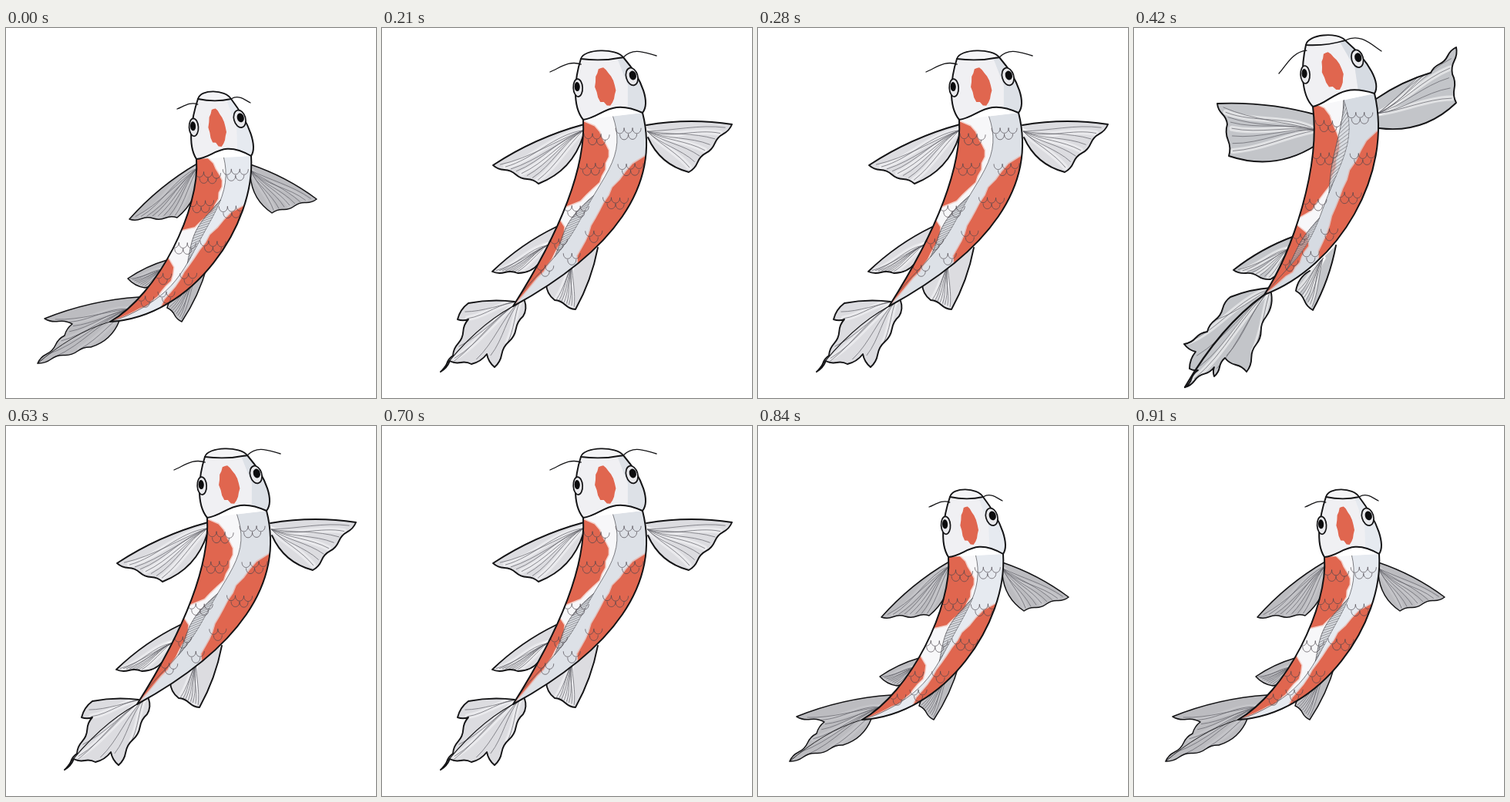
An HTML page with a canvas that plays this animation: 480 by 480 pixels, repeating every 1050 ms.

```html
<!DOCTYPE html>
<html lang="en">
<head>
<meta charset="utf-8">
<title>Swimming koi</title>
<style>
html, body { margin: 0; width: 100%; height: 100%; overflow: hidden; background: #fff; }
canvas { display: block; width: 480px; height: 480px; }
</style>
</head>
<body>
<canvas id="stage" width="480" height="480"></canvas>
<script>
const ctx = document.getElementById("stage").getContext("2d");
const INK = "#141416", ORANGE = "#e0664f", HATCH = "#4a4a50";
const POSE_MS = 210;
const ORDER = [0, 1, 2, 1, 0];

// left, right: Bezier flanks from neck to tail. mouth: its two corners.
// fins: leading root, rim corners, trailing root; the last fin is the tail.
// patches: [side, from, to, depth] and dorsal: [from, to], as shares of the body.
const poses = [
  {
    left: [[247, 170], [252, 235], [198, 345], [135, 381]],
    right: [[318, 166], [324, 255], [243, 375], [135, 381]],
    mouth: [[249, 92], [292, 92]],
    whiskers: [[222, 105], [317, 97]],
    fins: [
      [[248, 176], [160, 248], [222, 246], [250, 186]],
      [[317, 177], [403, 222], [345, 240], [317, 192]],
      [[209, 301], [158, 325], [180, 337], [199, 325]],
      [[261, 309], [228, 381], [209, 363], [230, 338]],
      [[173, 349], [50, 377], [86, 384], [76, 399], [41, 435], [110, 414], [147, 380]]
    ],
    patches: [[0, -0.03, 0.4, 0.46], [1, 0.23, 0.78, 0.45], [0, 0.55, 1, 0.5]],
    dorsal: [[0.22, 0.54]], drift: 0,
    tint: "#bcbcc0", streak: 0.12, shade: "#e6eaf0", finLine: 1.5, rib: 0.9
  },
  {
    left: [[261, 119], [265, 195], [215, 290], [170, 361]],
    right: [[338, 110], [362, 205], [300, 290], [170, 361]],
    mouth: [[258, 40], [313, 38]],
    whiskers: [[218, 57], [356, 36]],
    fins: [
      [[262, 125], [144, 178], [203, 202], [261, 140]],
      [[343, 126], [454, 125], [398, 187], [345, 142]],
      [[226, 258], [143, 316], [176, 318], [204, 305]],
      [[280, 285], [251, 365], [224, 353], [213, 332]],
      [[172, 355], [112, 357], [98, 378], [112, 378], [92, 425], [76, 446],
        [88, 432], [116, 436], [136, 423], [146, 440], [183, 374], [185, 354]]
    ],
    patches: [[0, 0.01, 0.46, 0.4], [1, 0.2, 0.75, 0.43], [0, 0.53, 1, 0.26]],
    dorsal: [[0.4, 0.72]], drift: 0.5,
    tint: "#dcdce0", streak: 0.4, shade: "#dde1e7", finLine: 1.9, rib: 1.2
  },
  {
    left: [[232, 102], [242, 180], [206, 290], [169, 346]],
    right: [[312, 85], [337, 190], [265, 310], [169, 346]],
    mouth: [[223, 22], [274, 16]],
    whiskers: [[188, 59], [321, 30]],
    fins: [
      [[238, 113], [108, 98], [121, 125], [123, 166], [236, 152]],
      [[314, 92], [385, 58], [418, 25], [413, 60], [418, 97], [318, 130]],
      [[208, 270], [129, 314], [177, 326], [195, 303]],
      [[262, 282], [232, 366], [210, 341], [228, 315]],
      [[178, 337], [125, 349], [95, 394], [65, 410], [80, 420], [72, 442], [83, 444],
        [66, 466], [104, 440], [104, 452], [118, 428], [146, 446], [171, 375], [177, 340]]
    ],
    patches: [[0, -0.02, 0.55, 0.38], [1, 0.15, 0.73, 0.4], [0, 0.59, 1, 0.55]],
    dorsal: [[0, 0.42], [0.54, 0.82]], drift: 0.3,
    tint: "#c3c5c9", streak: 0.5, shade: "#d6dbe2", finLine: 1.9, rib: 2.2
  }
];

const SCALE_SPOTS = [[0.11, 0.22], [0.09, 0.72], [0.26, 0.2], [0.26, 0.8], [0.43, 0.76],
  [0.48, 0.2], [0.6, 0.75], [0.65, 0.2], [0.72, 0.7], [0.79, 0.3]];

const lerp = (a, b, t) => a + (b - a) * t;
const mix = (p, q, t) => [lerp(p[0], q[0], t), lerp(p[1], q[1], t)];
const gap = (p, q) => Math.hypot(q[0] - p[0], q[1] - p[1]);
const range = n => Array.from({ length: n }, (_, i) => i);

function noise(seed) {
  const n = Math.sin(seed * 12.9898) * 43758.5453;
  return (n - Math.floor(n)) * 2 - 1;
}

function bezierAt([a, b, c, d], t) {
  const ab = mix(a, b, t), bc = mix(b, c, t), cd = mix(c, d, t);
  return mix(mix(ab, bc, t), mix(bc, cd, t), t);
}

// A point on the body: u runs from neck to tail, v from left to right.
const onBody = (pose, u, v) => mix(bezierAt(pose.left, u), bezierAt(pose.right, u), v);

// A point on the head: s runs from left to right, t from mouth to neck.
const onHead = (pose, s, t) =>
  mix(mix(...pose.mouth, s), mix(pose.left[0], pose.right[0], s), t);

function line(points) {
  const path = new Path2D();
  points.forEach(p => path.lineTo(...p));
  return path;
}

function fill(path, color) {
  ctx.fillStyle = color;
  ctx.fill(path);
}

function stroke(path, width, color = INK) {
  ctx.lineWidth = width;
  ctx.strokeStyle = color;
  ctx.stroke(path);
}

function clipped(path, draw) {
  ctx.save();
  ctx.clip(path);
  draw();
  ctx.restore();
}

// A curve from a to b, bent sideways near each end by a share of its length.
function wave(a, b, bend1, bend2) {
  const path = new Path2D();
  const side = (t, bend) => {
    const [x, y] = mix(a, b, t);
    return [x - (b[1] - a[1]) * bend, y + (b[0] - a[0]) * bend];
  };
  path.moveTo(...a);
  path.bezierCurveTo(...side(0.33, bend1), ...side(0.67, bend2), ...b);
  return path;
}

function finOutline(points) {
  const path = new Path2D();
  const last = points.length - 2;
  const [, tip] = points, end = points[last];
  const turn = Math.sign((tip[0] - points[0][0]) * (end[1] - tip[1]) -
    (tip[1] - points[0][1]) * (end[0] - tip[0])) || 1;
  const bow = (a, b, share) => {
    const [x, y] = mix(a, b, 0.5);
    path.quadraticCurveTo(x + (b[1] - a[1]) * share * turn, y - (b[0] - a[0]) * share * turn, ...b);
  };
  path.moveTo(...points[0]);
  for (let i = 0; i <= last; i++) {
    const a = points[i], b = points[i + 1];
    if (i === 0) bow(a, b, 0.08);
    else if (i === last) bow(a, b, 0.24);
    else {
      const folds = Math.max(1, Math.round(gap(a, b) / 17));
      range(folds).forEach(k =>
        bow(mix(a, b, k / folds), mix(a, b, (k + 1) / folds), k % 2 ? -0.18 : 0.18));
    }
  }
  return path;
}

function drawFin(points, pose) {
  const shape = finOutline(points);
  const rim = points.slice(1, -1);
  const root = mix(points[0], points[points.length - 1], 0.5);
  const rays = range(8).map(i => {
    const place = (i + 0.5) / 8 * (rim.length - 1), k = Math.floor(place);
    return wave(root, mix(root, mix(rim[k], rim[k + 1], place - k), 0.95),
      0.06 + 0.05 * noise(i), -0.06);
  });
  fill(shape, pose.tint);
  clipped(shape, () => {
    rays.forEach((ray, i) => {
      if (i % 3 === 1) stroke(ray, 7, `rgba(255,255,255,${pose.streak})`);
    });
    rays.forEach(ray => stroke(ray, 0.7, "#606168"));
  });
  stroke(shape, pose.finLine);
}

function drawTailRib(pose) {
  const tail = pose.fins[pose.fins.length - 1], root = pose.left[3];
  const tip = tail.reduce((far, p) => gap(root, p) > gap(root, far) ? p : far);
  stroke(wave(root, tip, 0.08, 0.06), pose.rib);
}

// A patch grows in from one flank, deepest halfway, with an uneven rim.
function drawPatch(pose, [side, from, to, depth], seed) {
  const steps = 14;
  const inner = range(steps + 1).map(i => {
    const p = i / steps;
    const d = depth * Math.sqrt(Math.sin(Math.PI * p)) * (1 + 0.1 * noise(i + seed * 31));
    return onBody(pose, lerp(from, to, p), side ? 1 - d : d);
  });
  const outer = range(steps + 1).map(i =>
    onBody(pose, lerp(to, from, i / steps), side ? 1.1 : -0.1));
  const shape = line([...inner, ...outer]);
  stroke(shape, 3, "rgba(236,140,120,0.4)");
  fill(shape, ORANGE);
}

const spineAt = (pose, u, offset = 0) =>
  onBody(pose, u, 0.5 + 0.05 * Math.sin(u * 11) - pose.drift * u * u - offset);

function drawDorsal(pose, [from, to]) {
  const steps = 22;
  const us = range(steps + 1).map(i => lerp(from, to, i / steps));
  const ridge = us.map(u => spineAt(pose, u));
  const edge = us.map((u, i) => spineAt(pose, u, 0.17 * Math.sin(Math.PI * i / steps)));
  fill(line([...ridge, ...[...edge].reverse()]), "rgba(198,203,210,0.6)");
  stroke(line(edge), 0.7, HATCH);
  ridge.slice(0, -2).forEach((p, i) => stroke(line([p, edge[i + 2]]), 0.5, HATCH));
}

// Small bowls: a row of three (two near the tail) over a staggered shorter one.
function drawScales(pose) {
  const path = new Path2D(), r = 5.5;
  for (const [u, v] of SCALE_SPOTS) {
    const [x, y] = onBody(pose, u, v);
    const cols = u < 0.5 ? 3 : 2;
    for (const row of [0, 1]) {
      range(cols - row).forEach(col => {
        const cx = x + (col - (cols - row - 1) / 2) * r * 2;
        const cy = y + row * 8 - 5 + noise(col + u * 50);
        path.moveTo(cx + r, cy - 1);
        path.bezierCurveTo(cx + r, cy + 8, cx - r, cy + 8, cx - r, cy - 1);
      });
    }
  }
  stroke(path, 0.7, "#4b464c");
}

function drawBody(pose) {
  const shape = new Path2D();
  const [neckL, l1, l2, tail] = pose.left, [neckR, r1, r2] = pose.right;
  shape.moveTo(...neckL);
  shape.bezierCurveTo(...l1, ...l2, ...tail);
  shape.bezierCurveTo(...r2, ...r1, ...neckR);
  const spine = range(31).map(i => spineAt(pose, i / 30));
  fill(shape, "#f7f7f9");
  clipped(shape, () => {
    fill(line([...spine, ...range(31).map(i => onBody(pose, 1 - i / 30, 1.1))]), pose.shade);
    pose.patches.forEach((patch, i) => drawPatch(pose, patch, i + 1));
    stroke(line(spine), 0.7, HATCH);
    pose.dorsal.forEach(span => drawDorsal(pose, span));
    drawScales(pose);
  });
  stroke(shape, 2);
}

function ellipse([x, y], rx, ry, turn) {
  const path = new Path2D();
  path.ellipse(x, y, rx, ry, turn, 0, Math.PI * 2);
  return path;
}

function drawEye(center, rx, turn, shift) {
  const eye = ellipse(center, rx, 11.5, turn);
  fill(eye, "#e9e9ec");
  stroke(eye, 1.7);
  fill(ellipse([center[0] + shift, center[1] - 1.5], rx * 0.6, 6, turn), "#0c0c0e");
}

function drawHead(pose) {
  const at = (s, t) => onHead(pose, s, t);
  const shape = new Path2D(), lips = new Path2D();
  shape.moveTo(...at(0, 0));
  shape.bezierCurveTo(...at(-0.14, 0.3), ...at(-0.2, 0.75), ...at(0, 1));
  shape.bezierCurveTo(...at(0.32, 1), ...at(0.5, 0.68), ...at(1, 1));
  shape.bezierCurveTo(...at(1.18, 0.85), ...at(1.24, 0.45), ...at(1, 0));
  shape.closePath();
  lips.moveTo(...at(0, 0));
  lips.bezierCurveTo(...at(0.08, -0.17), ...at(0.92, -0.17), ...at(1, 0));
  lips.quadraticCurveTo(...at(0.5, 0.06), ...at(0, 0));

  fill(shape, "#f0f0f3");
  clipped(shape, () => {
    fill(line([at(0.85, 0), at(0.9, 0.5), at(0.75, 1), at(1.4, 1), at(1.3, 0)]), pose.shade);
    const spot = line(range(22).map(i => {
      const a = i / 22 * Math.PI * 2, rough = 1 + 0.1 * noise(i + 5);
      return at(0.46 + 0.19 * Math.cos(a) * rough, 0.48 + 0.31 * Math.sin(a) * rough);
    }));
    fill(spot, ORANGE);
  });
  stroke(shape, 2);
  fill(lips, "#f4f4f6");
  stroke(lips, 1.8);
  drawEye(at(-0.08, 0.47), 6, -0.05, -1);
  drawEye(at(1.04, 0.35), 7.5, -0.27, 1);
  const [left, right] = pose.whiskers;
  stroke(wave(at(0, 0.09), left, 0.22, 0.05), 1.3);
  stroke(wave(at(1, 0), right, -0.3, -0.1), 1.3);
}

function drawKoi(pose) {
  ctx.fillStyle = "#fff";
  ctx.fillRect(0, 0, 480, 480);
  ctx.lineCap = ctx.lineJoin = "round";
  pose.fins.forEach(points => drawFin(points, pose));
  drawTailRib(pose);
  drawBody(pose);
  drawHead(pose);
}

const start = performance.now();
let shown = -1;

function tick() {
  const step = Math.floor((performance.now() - start) / POSE_MS) % ORDER.length;
  if (ORDER[step] !== shown) {
    shown = ORDER[step];
    drawKoi(poses[shown]);
  }
  requestAnimationFrame(tick);
}
tick();
</script>
</body>
</html>
```
